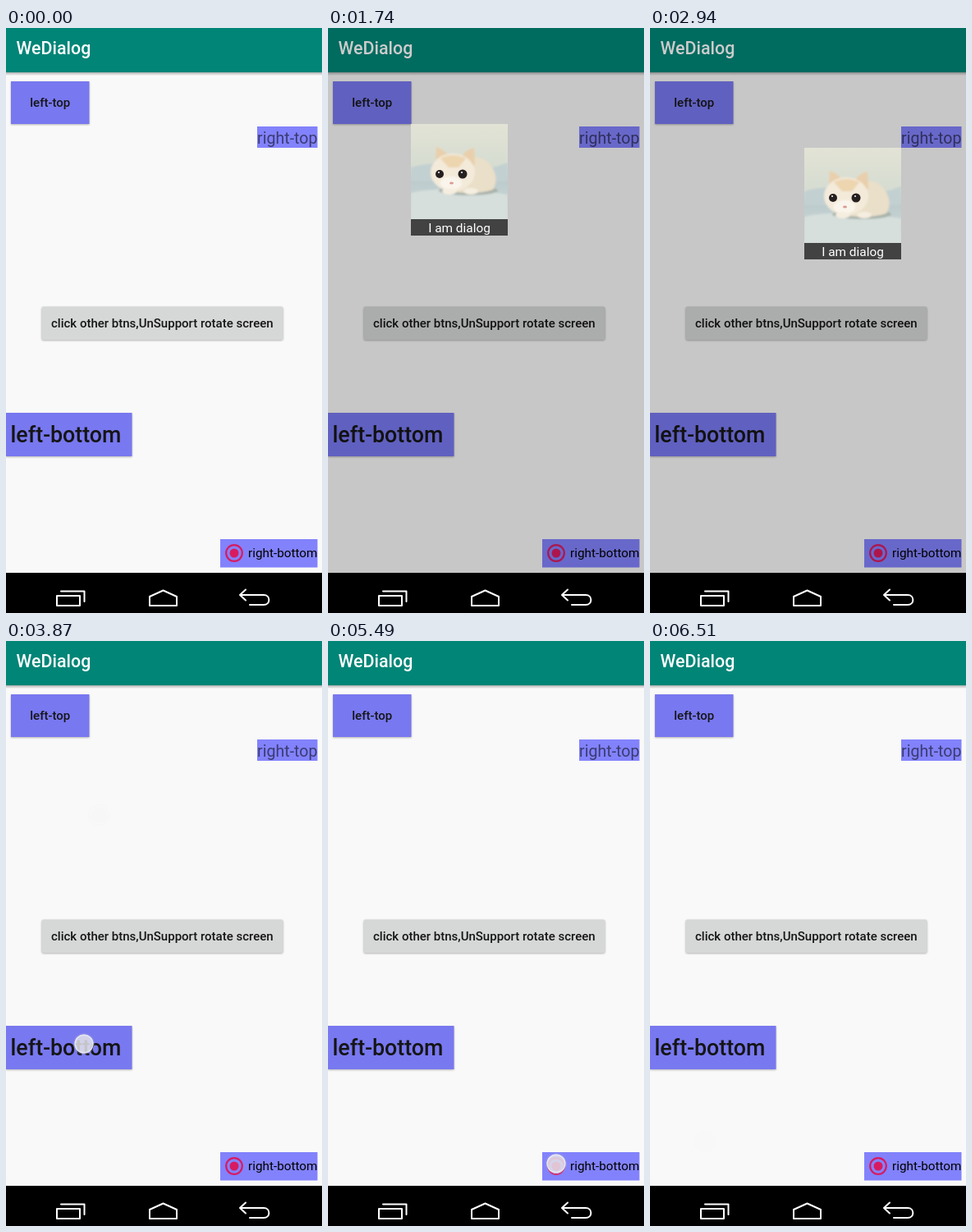
An HTML page for the animation above (7350 ms loop, 385 px wide and 713 px high).

```html
<!DOCTYPE html>
<html lang="en">
<head>
<meta charset="utf-8">
<title>Dialog demo</title>
<style>
html, body { margin: 0; width: 100%; height: 100%; overflow: hidden; background: #f9f9f9; }
svg { display: block; width: 385px; height: 713px; font-family: Roboto, sans-serif; }
.bold { font-weight: 500; fill: #151515; }
.raised { filter: drop-shadow(0 1px 1px rgba(0, 0, 0, .28)); }
.icon { fill: none; stroke: #fff; stroke-width: 2; stroke-linejoin: round; stroke-linecap: round; }
</style>
</head>
<body>
<svg viewBox="0 0 385 713">
  <defs>
    <linearGradient id="shade" x2="0" y2="1">
      <stop stop-color="#000" stop-opacity=".3"/>
      <stop offset="1" stop-color="#000" stop-opacity="0"/>
    </linearGradient>
    <linearGradient id="wall" x2="0" y2="1">
      <stop stop-color="#e2e3d5"/>
      <stop offset=".45" stop-color="#d6dcd1"/>
      <stop offset=".6" stop-color="#bccbcd"/>
      <stop offset="1" stop-color="#d3dcd9"/>
    </linearGradient>
    <filter id="soft"><feGaussianBlur stdDeviation=".8"/></filter>
    <clipPath id="photo"><path d="M0 0h118v116H0z"/></clipPath>
    <g id="spot">
      <circle r="13.3" fill="#a4a4d8" opacity=".28"/>
      <circle r="11.6" fill="#e6e6e8" opacity=".8"/>
      <circle r="10.8" fill="none" stroke="#f4f4f6" stroke-width="1.4" opacity=".6"/>
    </g>
  </defs>

  <rect width="385" height="664" fill="#f9f9f9"/>
  <rect width="385" height="54" fill="#008577"/>
  <rect y="54" width="385" height="4" fill="url(#shade)"/>
  <text x="12.5" y="32.3" font-size="21.4" font-weight="500" fill="#fff">WeDialog</text>

  <rect class="raised" x="6" y="65" width="95.5" height="52" fill="#7878f0"/>
  <text class="bold" x="53.7" y="96.2" font-size="15" text-anchor="middle">left-top</text>

  <rect x="306" y="120" width="73.5" height="26" fill="#8282fc"/>
  <text x="379.5" y="141" font-size="19.6" text-anchor="end" fill-opacity=".54">right-top</text>

  <rect class="raised" x="43.5" y="339.5" width="294" height="40.5" rx="2" fill="#d6d7d7"/>
  <text class="bold" x="190.3" y="365" font-size="15" text-anchor="middle">click other btns,UnSupport rotate screen</text>

  <rect class="raised" y="469" width="153.5" height="53" fill="#7878f0"/>
  <text class="bold" x="5.5" y="505" font-size="26.8">left-bottom</text>

  <rect x="261" y="623" width="118.5" height="34.5" fill="#8282fc"/>
  <circle cx="278" cy="640" r="9.8" fill="none" stroke="#d81b60" stroke-width="2.2"/>
  <circle cx="278" cy="640" r="5.5" fill="#d81b60"/>
  <text x="295" y="645" font-size="15.3">right-bottom</text>

  <rect id="dim" width="385" height="664" opacity="0"/>

  <g id="dialog" opacity="0">
    <g clip-path="url(#photo)">
      <rect width="118" height="116" fill="url(#wall)"/>
      <g filter="url(#soft)">
        <path d="M0 53Q30 44 58 52T118 47V70H0z" fill="#c3d0d1"/>
        <path d="M0 84Q40 74 118 86V116H0z" fill="#d6dfdc"/>
        <ellipse cx="70" cy="81" rx="36" ry="6" fill="#a9b2ac"/>
        <path d="M58 42Q85 35 98 51Q108 67 100 80Q80 87 46 82z" fill="#eadfc8"/>
        <path d="M30 47L31 28Q40 31 46 39L62 39Q68 31 77 29L78 50z" fill="#e9cfab"/>
        <ellipse cx="51" cy="59" rx="27" ry="23" fill="#f3eada"/>
        <path d="M36 42Q51 34 67 42L58 53H46z" fill="#edd5b0"/>
        <ellipse cx="49" cy="72" rx="13" ry="8" fill="#faf5ec"/>
        <ellipse cx="47" cy="82" rx="9" ry="4" fill="#f5eee0"/>
        <ellipse cx="73" cy="82" rx="9" ry="4" fill="#f5eee0"/>
      </g>
      <circle cx="35" cy="61" r="5" fill="#251f20"/>
      <circle cx="63" cy="61" r="5.5" fill="#251f20"/>
      <circle cx="34" cy="59" r="1" fill="#fff"/>
      <circle cx="62" cy="59" r="1" fill="#fff"/>
      <ellipse cx="49.5" cy="72" rx="2.5" ry="1.6" fill="#d89a91"/>
    </g>
    <rect y="116" width="118" height="20" fill="#424242"/>
    <text x="59" y="131.8" font-size="15.4" text-anchor="middle" fill="#fff">I am dialog</text>
  </g>

  <use id="oldTap" href="#spot" opacity="0"/>
  <use id="tap" href="#spot" opacity="0"/>

  <rect y="664" width="385" height="49"/>
  <g class="icon">
    <path d="M62 692h28v12H62zM67 686.5h28.5V699"/>
    <path d="M175 704V693L191.5 685.5 208 693V704z"/>
    <path d="M292 684.5L285 691 292 697.5M285 691H314C322.5 691 322.5 703 314 703H297"/>
  </g>
</svg>
<script>
const LOOP = 7350, STEP = 30;
const el = id => document.getElementById(id);
const clamp = v => Math.max(0, Math.min(1, v));

// Each tap: start, end, delay before it acts, position, trace left behind;
// open: dialog corner, close: true.
const taps = [
  { start: 900, end: 1110, delay: 60, x: 131, y: 202, trace: .07 },
  { start: 1440, end: 1740, delay: 90, x: 68, y: 96, trace: 0, open: [101, 117] },
  { start: 2070, end: 2340, delay: 60, x: 280, y: 194, trace: .07, close: true },
  { start: 2670, end: 2940, delay: 60, x: 343, y: 131, trace: 0, open: [188, 146] },
  { start: 3210, end: 3480, delay: 60, x: 113, y: 212, trace: .07, close: true },
  { start: 3870, end: 4200, delay: 60, x: 95, y: 491, trace: 0, open: [153, 333] },
  { start: 4440, end: 4650, delay: 30, x: 82, y: 236, trace: 0, close: true },
  { start: 5490, end: 5790, delay: 60, x: 278, y: 637, trace: 0, open: [143, 487] },
  { start: 6240, end: 6510, delay: 60, x: 67, y: 610, trace: .05, close: true }
];

const progress = (tap, t) => clamp((t - tap.start - tap.delay) / (tap.end - tap.start - tap.delay));

function place(node, x, y, opacity) {
  node.setAttribute('transform', `translate(${x} ${y})`);
  node.setAttribute('opacity', opacity);
}

function showTap(node, tap, t, visible) {
  if (!tap || !visible) return node.setAttribute('opacity', 0);
  place(node, tap.x, tap.y, 1 - (1 - tap.trace) * progress(tap, t));
}

function draw(now) {
  const t = Math.floor(now % LOOP / STEP) * STEP;
  const i = taps.findLastIndex(tap => tap.start <= t);
  const tap = taps[i], last = taps[i - 1];
  const p = tap ? progress(tap, t) : 0;

  showTap(el('tap'), tap, t, true);
  showTap(el('oldTap'), last, t, p === 0);

  const shown = tap?.open ? p : tap?.close ? 1 - p : 0;
  const corner = tap?.open || last?.open || [0, 0];
  el('dim').setAttribute('opacity', .2 * shown);
  place(el('dialog'), ...corner, clamp(tap?.close ? shown * 1.4 - .4 : shown * 1.4));
  requestAnimationFrame(draw);
}
requestAnimationFrame(draw);
</script>
</body>
</html>
```
